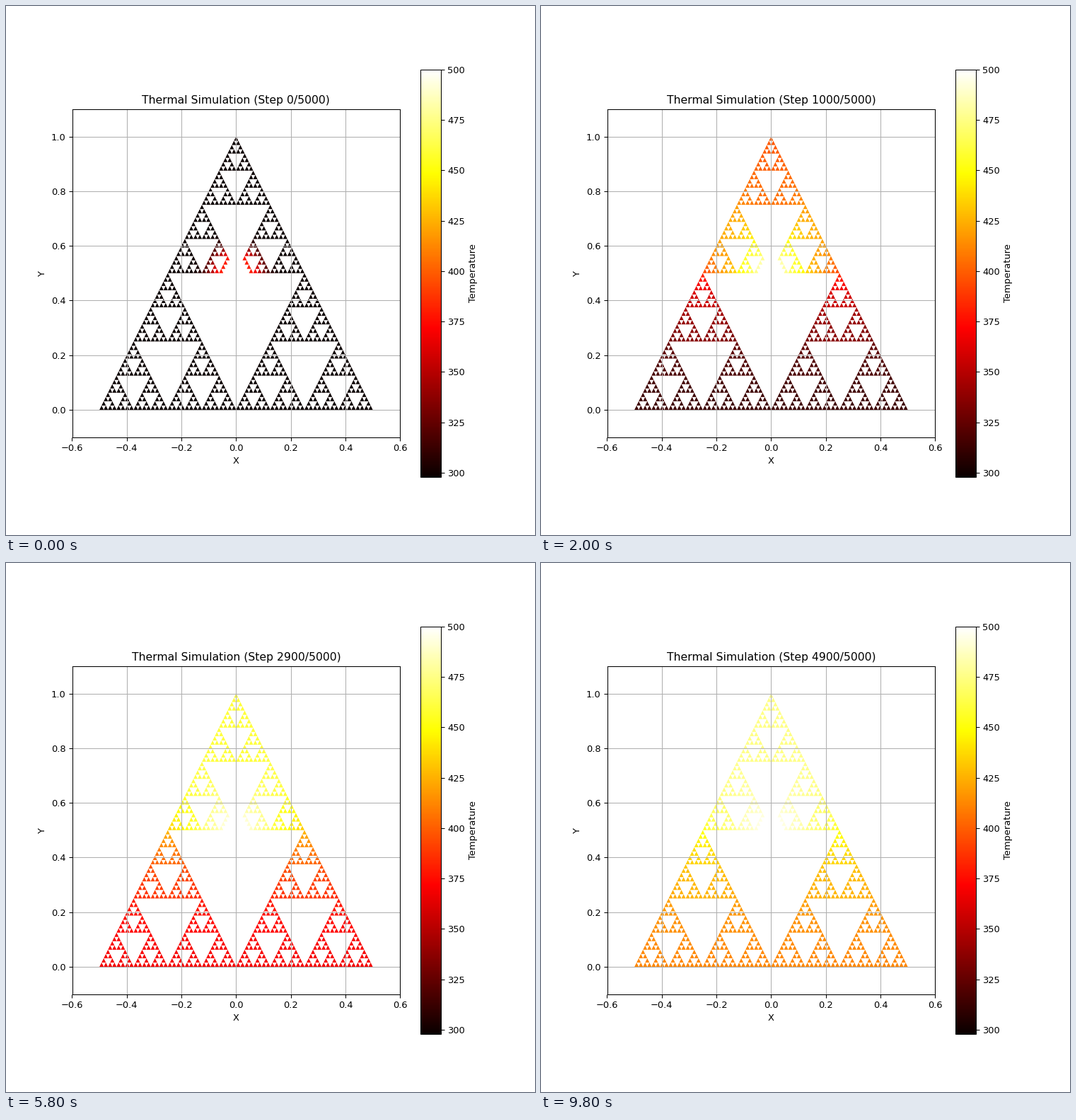
Recreate the animation shown at these times as a matplotlib script. Size 748 by 748 pixels, loop 10 s.

```python
import numpy as np
import matplotlib.pyplot as plt
from matplotlib.animation import FuncAnimation
from matplotlib.collections import PolyCollection

ROWS = 64             # smallest triangles along one side
FRAMES, STRIDE, TOTAL = 50, 100, 5000
COLD, HOT = 298.0, 500.0
SUBSTEPS, FRAME_TIME = 8, 64.0
EDGE_LINK = 0.25      # conductance between the heater and its neighbours


def build_cells():
    """Sierpinski cells as (row, column) pairs, row 0 at the apex."""
    return [(r, c) for r in range(ROWS) for c in range(r + 1) if c & (r - c) == 0]


def triangle(r, c):
    x, y = (c - r / 2) / ROWS, 1 - r / ROWS
    half, h = 0.5 / ROWS, 1 / ROWS
    return [(x, y), (x - half, y - h), (x + half, y - h)]


def simulate(cells, radius):
    """Temperatures of all cells for every frame."""
    index = {cell: i for i, cell in enumerate(cells)}
    heater = radius < 0.05
    lap = np.zeros((len(cells), len(cells)))
    for (r, c), i in index.items():
        for other in ((r, c + 1), (r + 1, c), (r + 1, c + 1)):
            j = index.get(other)
            if j is None:
                continue
            k = EDGE_LINK if heater[i] != heater[j] else 1.0
            lap[i, j] -= k
            lap[j, i] -= k
            lap[i, i] += k
            lap[j, j] += k
    free = ~heater
    dt = FRAME_TIME / SUBSTEPS
    step = np.linalg.inv(np.eye(free.sum()) + dt * lap[np.ix_(free, free)])

    start = COLD + 82 * np.exp(-((radius[free] - 0.05) / 0.055) ** 2)
    deficit = HOT - start
    history = np.full((FRAMES, len(cells)), HOT)
    for n in range(FRAMES):
        history[n, free] = HOT - deficit
        for _ in range(SUBSTEPS):
            deficit = step @ deficit
    return history


cells = build_cells()
polys = np.array([triangle(r, c) for r, c in cells])
centres = polys.mean(axis=1)
temps = simulate(cells, np.hypot(centres[:, 0], centres[:, 1] - 0.5))

fig, ax = plt.subplots(figsize=(8, 8), dpi=93.5)
mesh = PolyCollection(polys, cmap="hot", array=temps[0])
mesh.set_clim(COLD, HOT)
ax.add_collection(mesh)
fig.colorbar(mesh, ax=ax, label="Temperature")
ax.set(xlim=(-0.6, 0.6), ylim=(-0.1, 1.1), xlabel="X", ylabel="Y", aspect="equal")
ax.grid(True)
title = ax.set_title("")


def update(n):
    mesh.set_array(temps[n])
    title.set_text(f"Thermal Simulation (Step {n * STRIDE}/{TOTAL})")
    return mesh, title


anim = FuncAnimation(fig, update, frames=FRAMES, interval=200, repeat=True)
plt.show()
```
